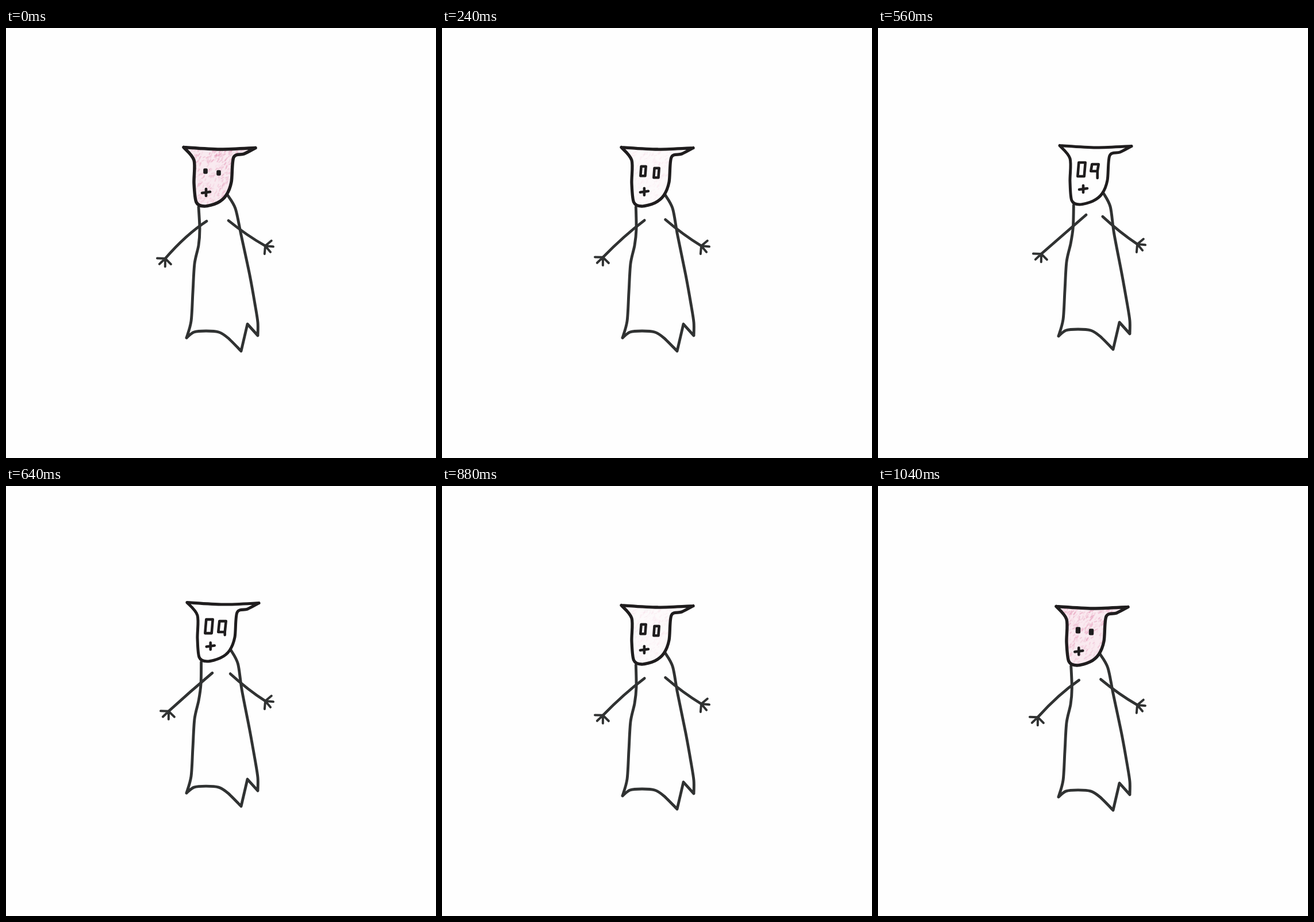
An HTML page with a canvas for the animation above (1120 ms loop, 748 px wide and 748 px high).

```html
<!DOCTYPE html>
<html lang="en">
<head>
<meta charset="utf-8">
<title>Little ghost</title>
<style>
html, body { margin: 0; width: 100%; height: 100%; overflow: hidden; background: #fefefe; }
canvas { display: block; width: 100vw; height: 100vh; }
</style>
</head>
<body>
<canvas id="stage" width="748" height="748"></canvas>
<script>
const ctx = document.getElementById('stage').getContext('2d');
const STEP = 80;
const LAST = 7;
const INK = '#1f1d1e';
const BODY_INK = '#303232';

// Key points of the figure at rest
const earL = [309, 207.5], earR = [434, 208.5];
const foot = [314, 539], dip = [409, 562], peak = [420, 515], heel = [438, 535];
const brim = [earL, [372, 211], earR];
const face = [earR, [414, 219], [396, 225], [392, 268], [383, 291], [368, 304],
  [345, 310], [331, 303], [327, 270], [327, 230], earL];
const back = [[335, 311], [337, 350], [335, 378], [328, 410], [325, 460], [322, 510], foot];
const hem = [foot, [327, 529], [348, 527], [370, 529], [386, 539], dip];
const front = [[385, 290], [399, 314], [409, 360], [424, 430], [433, 480], [438, 512], heel];

const clamp = v => Math.max(0, Math.min(1, v));
const smooth = v => { v = clamp(v); return v * v * (3 - 2 * v); };

function seeded(seed) {
  return () => (seed = (seed * 16807) % 2147483647) / 2147483647;
}

// The whole figure bobs; the upper part also leans to the right.
function pose(u) {
  const bob = 3 * Math.sin(2 * Math.PI * u) - 3 * u;
  return ([x, y]) => [x + 7 * u * clamp((380 - y) / 90), y + bob];
}

// Adds a smooth curve through the points to the current path.
function curve(pts, start = true) {
  const at = i => pts[Math.max(0, Math.min(pts.length - 1, i))];
  const t = 0.15;
  if (start) ctx.moveTo(...pts[0]);
  for (let i = 0; i < pts.length - 1; i++) {
    const a = at(i - 1), b = at(i), c = at(i + 1), d = at(i + 2);
    ctx.bezierCurveTo(
      b[0] + (c[0] - a[0]) * t, b[1] + (c[1] - a[1]) * t,
      c[0] - (d[0] - b[0]) * t, c[1] - (d[1] - b[1]) * t,
      ...c);
  }
}

function pen(width, color) {
  ctx.lineWidth = width;
  ctx.strokeStyle = color;
}

function strokes(list) {
  ctx.beginPath();
  list.forEach(pts => curve(pts));
  ctx.stroke();
}

// An arm with a slight bow, ending in four evenly fanned fingers
function arm([sx, sy], [hx, hy], bow, from, to) {
  pen(4.8, BODY_INK);
  ctx.beginPath();
  ctx.moveTo(sx, sy);
  ctx.quadraticCurveTo((sx + hx) / 2, (sy + hy) / 2 + bow, hx, hy);
  ctx.stroke();
  pen(4, BODY_INK);
  ctx.beginPath();
  for (let i = 0; i < 4; i++) {
    const angle = (from + (to - from) * i / 3) * Math.PI / 180;
    ctx.moveTo(hx, hy);
    ctx.lineTo(hx + 14 * Math.cos(angle), hy + 14 * Math.sin(angle));
  }
  ctx.stroke();
}

// Small dots grow into tall slanted boxes.
function eye([x, y], grow, tail = 0) {
  const r = 1.5 + 4.2 * grow, h = 2.5 + 9.5 * grow, slant = grow;
  const base = y + h - tail;
  ctx.beginPath();
  ctx.moveTo(x - r + slant, y - h);
  ctx.lineTo(x + r + slant, y - h);
  ctx.lineTo(x + r - slant, base);
  ctx.lineTo(x - r - slant, base);
  ctx.closePath();
  ctx.moveTo(x + r - slant, base);
  ctx.lineTo(x + r - slant, base + tail);
  ctx.stroke();
}

function mouth([x, y]) {
  ctx.beginPath();
  ctx.moveTo(x - 7, y + 1);
  ctx.lineTo(x + 7, y - 1);
  ctx.moveTo(x, y - 6);
  ctx.lineTo(x, y + 6);
  ctx.stroke();
}

function crayon(top, side, pink, seed) {
  const rnd = seeded(seed);
  ctx.save();
  ctx.beginPath();
  curve(top);
  curve(side, false);
  ctx.closePath();
  ctx.fillStyle = '#fefefe';
  ctx.fill();
  ctx.fillStyle = `rgba(236, 184, 204, ${0.3 * pink})`;
  ctx.fill();
  ctx.clip();
  pen(2.2, '#e294b4');
  for (let i = 0; i < 600; i++) {
    const x = 310 + rnd() * 110, down = rnd();
    const y = 205 + down * 105;
    ctx.globalAlpha = 0.55 * pink * rnd() * (1 - 0.6 * down);
    ctx.beginPath();
    ctx.moveTo(x, y);
    ctx.lineTo(x + 1 + rnd() * 3, y - 1 - rnd() * 4);
    ctx.stroke();
  }
  ctx.restore();
}

function draw(index) {
  const u = index / LAST;
  const move = pose(u);
  const shape = pts => pts.map(move);
  const grow = smooth(u / 0.75);
  const pink = 1 - smooth((u - 0.1) / 0.45);

  ctx.fillStyle = '#fefefe';
  ctx.fillRect(0, 0, 748, 748);
  ctx.lineCap = ctx.lineJoin = 'round';

  pen(4.9, BODY_INK);
  strokes([back, hem, [dip, peak], [peak, heel], front].map(shape));
  arm(move([349 + 9 * u * u, 336 - 8 * u * u]), move([277 + 7 * u, 401 - 5 * u]),
    -9 * (1 - u), 182, 45);
  arm(move([387, 335 - 4 * u]), move([451, 379]), 4, -40, 95);

  const top = shape(brim), side = shape(face);
  crayon(top, side, pink, 71 + index * 977);
  pen(5.5 - 0.5 * u, INK);
  strokes([top, side]);

  pen(4.6, INK);
  eye(move([347, 249]), grow);
  eye(move([370, 252]), grow, 12 * clamp(4 * u - 3));
  mouth(move([348 + 2 * u, 286 - 3 * u]));
}

// Eight drawings, played forwards and then back
let shown = -1;
function tick() {
  const step = Math.floor(performance.now() / STEP) % (2 * LAST);
  const index = LAST - Math.abs(LAST - step);
  if (index !== shown) draw(shown = index);
  requestAnimationFrame(tick);
}
tick();
</script>
</body>
</html>
```
